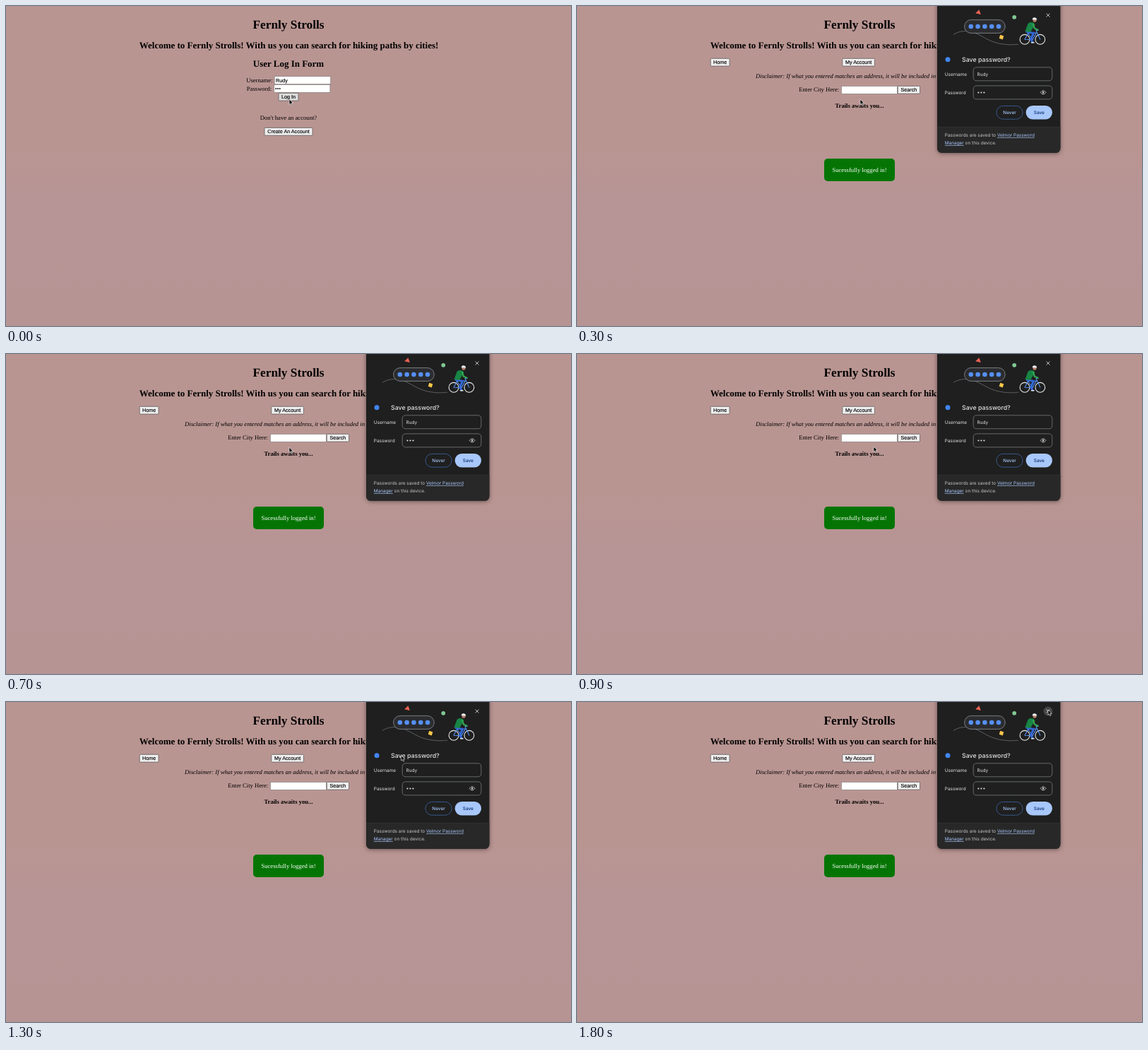
Animation of 800x453 px, one loop 1900 ms. Source, as an HTML page:

```html
<!DOCTYPE html>
<html lang="en">
<head>
<meta charset="utf-8">
<title>Log in demo</title>
<style>
  html, body { margin: 0; width: 100%; height: 100%; overflow: hidden; }
  body { background: linear-gradient(#b99592 45%, #b79495 60%, #b79494); }
  svg { display: block; width: 800px; height: 453px; }
  text { font: 8.65px "Liberation Serif", "Times New Roman", serif; text-rendering: geometricPrecision; }
  .mid { text-anchor: middle; }
  .h1 { font-size: 17.3px; font-weight: bold; }
  .h2 { font-size: 12.97px; font-weight: bold; }
  .strong { font-weight: bold; }
  .italic { font-style: italic; }
  .ui text { font: 7.2px "Liberation Sans", Arial, sans-serif; stroke: #000; stroke-width: .15; }
  .button rect { fill: #efefef; stroke: #605c5c; stroke-width: .8; }
  .button.hover rect { fill: #dcdcdc; }
  .input rect { fill: #fff; stroke: #8a8080; stroke-width: .8; }
  #popup text { font: 6.45px Inter, Roboto, sans-serif; fill: #e3e3e3; }
  #popup .title { font-size: 8.8px; font-weight: 500; }
  #popup .pill { font-weight: 500; text-anchor: middle; }
  #popup .note { fill: #c7c7c7; }
  #popup .link { fill: #a8c7fa; text-decoration: underline; }
  .panel { filter: drop-shadow(0 1px 3px rgba(0, 0, 0, .45)); }
  .field { fill: none; stroke: #85888a; stroke-width: .7; }
</style>
</head>
<body>
<svg viewBox="0 0 800 453">
  <text class="h1 mid" x="400" y="31.8">Fernly Strolls</text>
  <text class="h2" x="188.8" y="59.8">Welcome to Fernly Strolls! With us you can search for hiking paths by cities!</text>

  <g id="login">
    <text class="h2 mid" x="400" y="85.6">User Log In Form</text>
    <text x="340.2" y="107.7">Username:</text>
    <text x="340.8" y="119.5">Password:</text>
    <text class="mid" x="400" y="161.2">Don't have an account?</text>
    <g class="ui input">
      <rect x="380.2" y="99.5" width="79.5" height="11.2"/>
      <rect x="379.4" y="111.3" width="79.5" height="11.2"/>
      <text x="382" y="107.6">Rudy</text>
      <circle cx="382.3" cy="117" r=".95"/><circle cx="385" cy="117" r=".95"/><circle cx="387.7" cy="117" r=".95"/>
    </g>
    <g class="ui button hover">
      <rect x="386" y="123.3" width="28" height="10.8" rx="1"/>
      <text class="mid" x="400" y="131.1">Log In</text>
    </g>
    <g class="ui button">
      <rect x="366" y="172.4" width="68" height="10.8" rx="1"/>
      <text class="mid" x="400" y="180.3">Create An Account</text>
    </g>
  </g>

  <g id="app">
    <text class="italic" x="253" y="102.2">Disclaimer: If what you entered matches an address, it will be included in</text>
    <text x="314.2" y="121.4">Enter City Here:</text>
    <text class="mid strong" x="400" y="144.2">Trails awaits you...</text>
    <g class="ui input"><rect x="374.3" y="113.3" width="79.3" height="11.2"/></g>
    <g class="ui button">
      <rect x="189.2" y="74.3" width="26.8" height="10.8" rx="1"/>
      <text class="mid" x="202.6" y="82.2">Home</text>
      <rect x="375.8" y="74.3" width="45.6" height="10.8" rx="1"/>
      <text class="mid" x="398.6" y="82.2">My Account</text>
    </g>
    <g class="ui button" id="search">
      <rect x="454.2" y="113.3" width="31.4" height="10.8" rx="1"/>
      <text class="mid" x="469.9" y="121.2">Search</text>
    </g>
    <rect x="350" y="216" width="100" height="32" rx="5" fill="#047504"/>
    <text class="mid" x="400" y="235" fill="#fff">Sucessfully logged in!</text>

    <g id="popup">
      <rect class="panel" x="510" y="-10" width="174.4" height="217.8" rx="6.5" fill="#1f1f1f"/>
      <path d="M510 171.3h174.4v30a6.5 6.5 0 0 1-6.5 6.5H516.5a6.5 6.5 0 0 1-6.5-6.5z" fill="#282828"/>
      <path d="M510 171.3h174.4" stroke="#3a3a3a" stroke-width=".6"/>

      <!-- illustration -->
      <g fill="none" stroke="#6b6e72" stroke-width=".8">
        <path d="M533 40.5C541 35 552 34 563 38S584 51 600 53.5 618 54.3 625 54.3"/>
        <rect x="548.6" y="19.6" width="57.6" height="18.8" rx="9.4" fill="#2b2c2f" stroke="#909397"/>
      </g>
      <g fill="#5590f5">
        <circle cx="557.8" cy="29" r="3.3"/><circle cx="567.6" cy="29" r="3.3"/><circle cx="577.4" cy="29" r="3.3"/>
        <circle cx="587.2" cy="29" r="3.3"/><circle cx="597" cy="29" r="3.3"/>
      </g>
      <path d="M569.4 5.2L571.8 11.9 564.2 10.3z" fill="#ee6254"/>
      <circle cx="619.2" cy="15.8" r="2.9" fill="#81c995"/>
      <path d="M599.3 40.8l5 1.6-1.6 5-5-1.6z" fill="#fcc64b"/>
      <g fill="none" stroke-linecap="round" stroke-linejoin="round">
        <g stroke="#e8eaed" stroke-width="1.1"><circle cx="634" cy="47.3" r="6.9"/><circle cx="655.8" cy="47.3" r="6.9"/></g>
        <path d="M634 47.3L638.5 38.5 650.5 38 645 47.8 634 47.3M638.5 38.5L645 47.8M655.8 47.3L650 34.5H653" stroke="#5590f5" stroke-width="1.1"/>
        <path d="M637 36.5L646.5 38.5 642.5 47 645 51" stroke="#3367d6" stroke-width="3"/>
        <path d="M643.5 51.7h3.5" stroke="#e8eaed" stroke-width="1.4"/>
        <path d="M634.5 36L638.5 25Q641 22 646 23.5L648.5 26 642 37z" fill="#188544"/>
        <path d="M646 26L648 31.8 652.5 33.7" stroke="#34a853" stroke-width="2.2"/>
        <circle cx="648" cy="20.3" r="2.5" fill="#b9806a"/>
        <path d="M644.7 19.2Q645 16 648.3 16.3 651 16.8 651.3 19.5z" fill="#f1f3f4"/>
      </g>

      <circle id="halo" cx="667" cy="13" r="6.5" fill="#444648"/>
      <path d="M664.5 10.5l5 5m0-5l-5 5" stroke="#d0d0d0" stroke-width=".9"/>

      <circle cx="525" cy="75.8" r="3.5" fill="#4285f4"/>
      <text class="title" x="545" y="79">Save password?</text>
      <text x="520.8" y="98.8">Username</text>
      <text x="520.8" y="124.8">Password</text>
      <rect class="field" x="561.2" y="86.8" width="111.6" height="19" rx="4.2"/>
      <rect class="field" x="561.2" y="112.9" width="111.6" height="19" rx="4.2"/>
      <text x="566.5" y="98.8">Rudy</text>
      <g fill="#e3e3e3"><circle cx="568.4" cy="122.5" r="1.1"/><circle cx="572.4" cy="122.5" r="1.1"/><circle cx="576.4" cy="122.5" r="1.1"/></g>
      <path d="M656.2 122.4q3.9-5.2 7.8 0q-3.9 5.2-7.8 0z" fill="none" stroke="#c7c7c7" stroke-width=".9"/>
      <circle cx="660.1" cy="122.4" r="1.3" fill="#c7c7c7"/>
      <rect x="593.9" y="141.4" width="37.2" height="18.8" rx="9.4" fill="none" stroke="#3d66a6" stroke-width=".8"/>
      <text class="pill" x="612.5" y="153.3" style="fill:#a8c7fa">Never</text>
      <rect x="635.6" y="141" width="37.4" height="19.5" rx="9.75" fill="#a8c7fa"/>
      <text class="pill" x="654.3" y="153.3" style="fill:#062e6f">Save</text>
      <text class="note" x="520.8" y="185.2">Passwords are saved to <tspan class="link">Velmor Password</tspan></text>
      <text class="note" x="520.8" y="196.2"><tspan class="link">Manager</tspan> on this device.</text>
    </g>
  </g>

  <path id="cursor" d="M0 0V7.4L1.7 5.9 2.9 8.6 4.2 8 3 5.4H5.3z" fill="#000" stroke="#fff" stroke-width=".6"/>
</svg>
<script>
  const LOOP = 1900, STEP = 100;
  const byId = id => document.getElementById(id);
  const show = (id, on) => byId(id).style.display = on ? "" : "none";

  // Pointer stops: time, x, y
  const path = [
    [0, 401, 132], [800, 401, 132], [900, 420, 131], [1100, 480, 124],
    [1200, 510, 109], [1400, 609, 42], [1500, 638, 23], [1700, 663, 12], [1800, 667, 11]
  ];

  function pointer(t) {
    const i = path.findIndex(p => p[0] > t);
    if (i < 0) return path.at(-1).slice(1);
    const [t0, x0, y0] = path[i - 1], [t1, x1, y1] = path[i];
    const k = (t - t0) / (t1 - t0);
    return [x0 + (x1 - x0) * k, y0 + (y1 - y0) * k];
  }

  function draw(now) {
    const t = Math.floor(now % LOOP / STEP) * STEP;
    const [x, y] = pointer(t);
    show("login", t < 300);
    show("app", t >= 300);
    show("halo", Math.hypot(x - 667, y - 13) < 6.5);
    byId("search").classList.toggle("hover", x > 454 && x < 486 && y > 113 && y < 125);
    byId("cursor").setAttribute("transform", `translate(${x} ${y})`);
  }

  const start = performance.now();
  function tick() {
    draw(performance.now() - start);
    requestAnimationFrame(tick);
  }
  tick();
</script>
</body>
</html>
```
